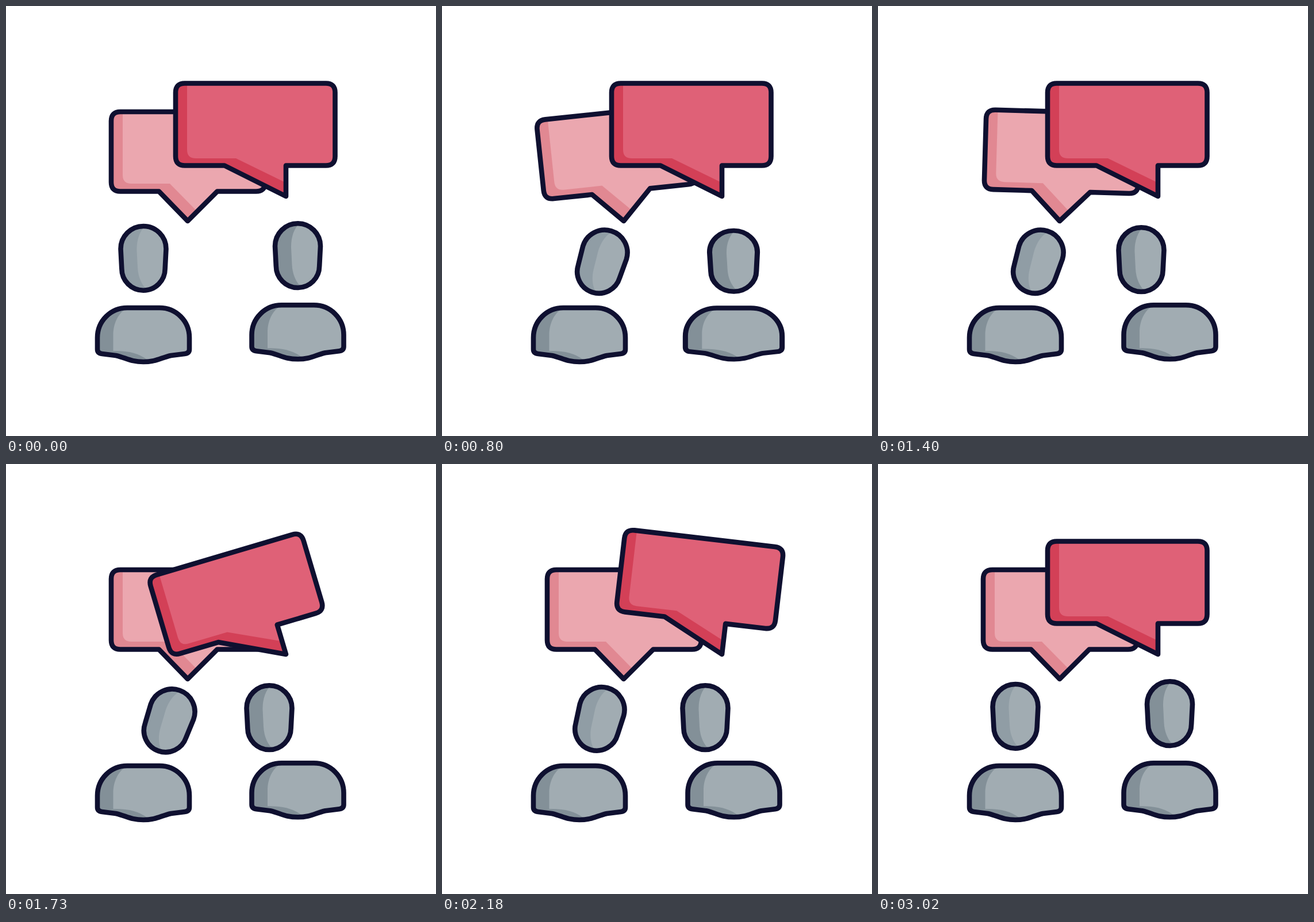
Recreate the animation shown at these times as an HTML page. Size 748 by 748 pixels, loop 3050 ms.

```html
<!DOCTYPE html>
<html>
<head>
<meta charset="utf-8">
<style>
  html, body { margin: 0; width: 100%; height: 100%; overflow: hidden; background: #fff; }
  svg { display: block; width: 100vw; height: 100vh; }
  .line { fill: none; stroke: #0f1030; stroke-width: 8.6; stroke-linejoin: round; }
</style>
</head>
<body>
<svg id="stage" viewBox="0 0 748 748"></svg>
<script>
const stage = document.getElementById('stage');
const LOOP = 3050, FIRST = 530, STEP = 30;
let clips = 0;

// An outlined shape in a shade colour with a lighter area inside it.
function part(id, outline, light, shade, fill) {
  const clip = 'clip' + clips++;
  return `<g id="${id}"><clipPath id="${clip}"><path d="${outline}"/></clipPath>
    <path d="${outline}" fill="${shade}"/>
    <path d="${light}" fill="${fill}" clip-path="url(#${clip})"/>
    <path d="${outline}" class="line"/></g>`;
}

const HEAD = 'M-39.5 422.5A39.5 39.5 0 0 1 39.5 422.5L37.7 457A37.7 37.7 0 0 1 -37.7 457Z';
const HEAD_LIGHT = 'M8 380C-5 386 -12 405 -11.5 425L-10 455C-9 475 0 490 10 497H60V380Z';
const BODY = 'M-80 597V577C-80 548 -57 525 -28 525H28C57 525 80 548 80 577V597Q80 604 72 605L48 608C30 612 22 619 0 619C-22 619 -30 612 -48 608L-72 605Q-80 604 -80 597Z';
const BODY_LIGHT = 'M-26 524C-44 533 -52.5 552 -52.5 573V600Q-14 599 6 615V630H90V520Z';

const person = (id, headShade) => `<g id="${id}">
  ${part(id + 'Body', BODY, BODY_LIGHT, '#839098', '#a1acb2')}
  ${part(id + 'Head', HEAD, HEAD_LIGHT, headShade, '#a1acb2')}</g>`;

stage.innerHTML =
  part('leftBubble',
    'M199 184H435Q451 184 451 200V306.5Q451 322.5 435 322.5H367.5L316 374L266 322.5H199Q183 322.5 183 306.5V200Q183 184 199 184Z',
    'M203 170V294Q203 309 218 309H285L340 365L470 330V170Z', '#e18892', '#eba7af') +
  part('rightBubble',
    'M311 134.5H556.5Q572.5 134.5 572.5 150.5V261.5Q572.5 277.5 556.5 277.5H487V331L380 277.5H311Q295 277.5 295 261.5V150.5Q295 134.5 311 134.5Z',
    'M315 120V250Q315 265 330 265H400L490 309V290H590V120Z', '#d34057', '#df6177') +
  person('left', '#909da5') + person('right', '#839098');

// Eased interpolation through [time, value] keys.
function track(t, keys) {
  if (t <= keys[0][0]) return keys[0][1];
  for (let i = 1; i < keys.length; i++) {
    const [t0, a] = keys[i - 1], [t1, b] = keys[i];
    if (t < t1) return a + (b - a) * (1 - Math.cos(Math.PI * (t - t0) / (t1 - t0))) / 2;
  }
  return keys[keys.length - 1][1];
}

const bump = (t, a, b) => t > a && t < b ? Math.sin(Math.PI * (t - a) / (b - a)) : 0;
const set = (id, transform) => document.getElementById(id).setAttribute('transform', transform);

const SWING = [[0, 0], [180, -22], [465, 15], [733, -10], [975, 4], [1140, 0]];
const LEAN = [[500, 0], [700, 17], [1600, 17], [1830, 21], [2020, 15], [2560, 15], [2780, 0]];
const SHIFT = [[780, 0], [1150, -49.5], [2400, -49.5], [2570, 0]];
const TILT = [[780, 0], [1000, -16], [1230, 0]];

// Squashes a person towards the floor line.
const place = (id, x, y, s) =>
  set(id, `translate(${x} ${y + 623}) scale(${1 + s} ${1 - s}) translate(0 -623)`);

function draw(t) {
  set('leftBubble', `rotate(${track(t - 490, SWING)} 316 373)`);
  set('rightBubble', `rotate(${track(t - 1610, SWING)} 487 331)`);

  place('left', 239, 0, 0.06 * (bump(t, 515, 800) + bump(t, 2540, 2830)));
  set('leftHead', `rotate(${track(t, LEAN)} 0 573)`);

  place('right', 507.5, -4.7, 0.06 * (bump(t, 700, 1000) + bump(t, 2470, 2680)));
  const x = track(t, SHIFT);
  const dip = 7 * (x / 49.5) ** 6;
  set('rightHead', `translate(${x} ${dip}) rotate(${track(t, TILT)} 0 438.5)`);
}

const start = performance.now();
function tick() {
  const t = (performance.now() - start) % LOOP;
  draw(t < FIRST ? 0 : FIRST + Math.floor((t - FIRST) / STEP) * STEP);
  requestAnimationFrame(tick);
}
tick();
</script>
</body>
</html>
```
